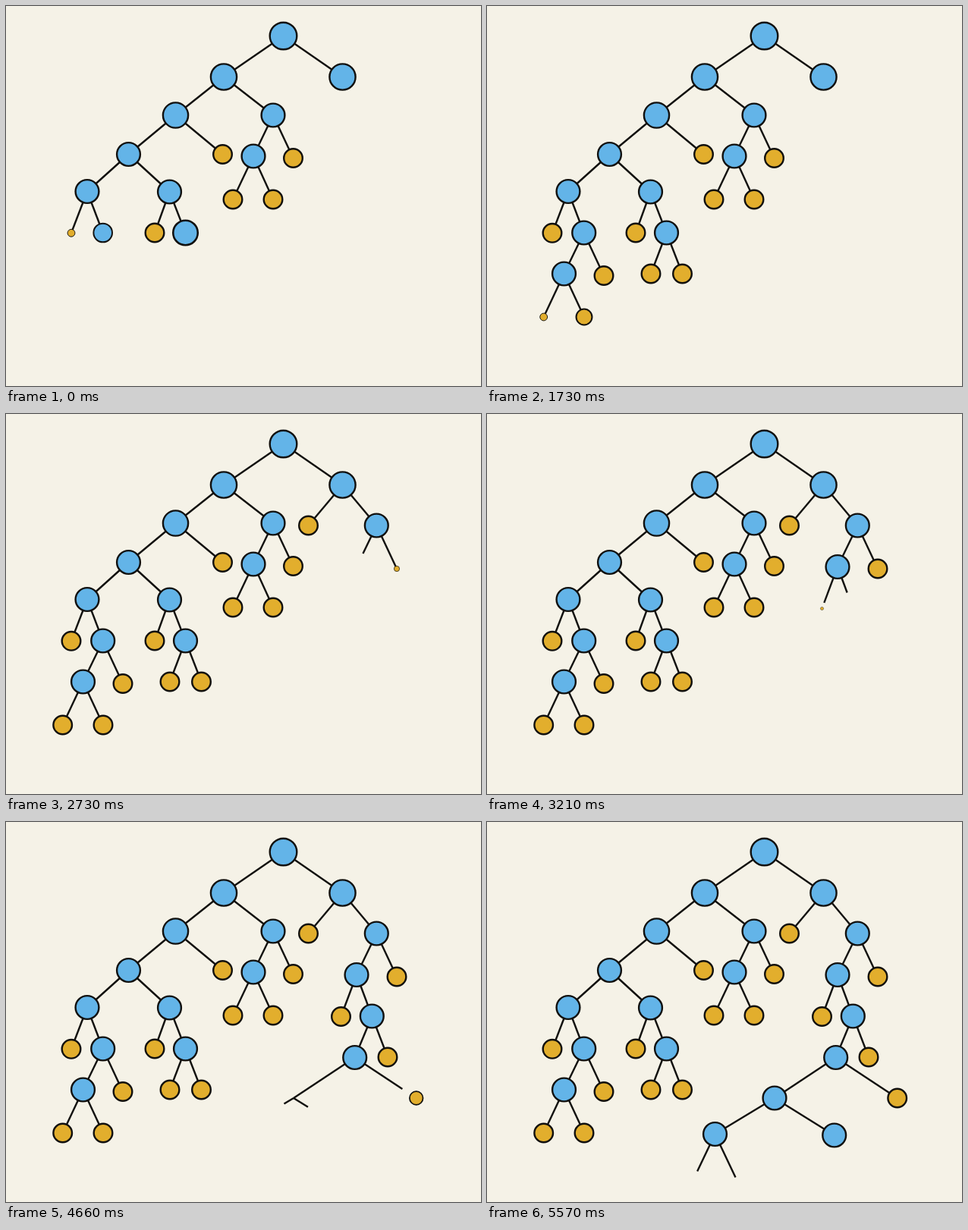
These frames come from a looping animation (626 by 501 pixels, 5590 ms). An HTML page with a canvas:

```html
<!DOCTYPE html>
<html lang="en">
<head>
<meta charset="utf-8">
<title>Growing tree</title>
<style>
html, body { margin: 0; width: 100%; height: 100%; overflow: hidden; background: #f5f2e7; }
canvas { display: block; width: 626px; height: 501px; }
</style>
</head>
<body>
<canvas id="stage"></canvas>
<script>
const W = 626, H = 501, LOOP = 5590;
const PEN_SPEED = 0.24;   // px per ms
const POP_TIME = 250;
const INK = "#11100e", BLUE = "#63b4e8", GOLD = "#e2ae2d", PAPER = "#f5f2e7";
const LINE = 2.4;
const ALWAYS = -9999;

const nodes = [];

// edgeAt: when the line to the parent starts; popAt: when the disc starts to grow
function add(fill, r, parent, x, y, edgeAt = ALWAYS, popAt = ALWAYS, popTime = POP_TIME) {
  const node = { fill, r, parent, x, y, edgeAt, popAt, popTime };
  nodes.push(node);
  return node;
}
const big = (r, ...rest) => add(BLUE, r, ...rest);
const blue = (...rest) => add(BLUE, 16.6, ...rest);
const gold = (...rest) => add(GOLD, 13.5, ...rest);

// Standing part of the tree
const root = big(19, null, 365.5, 39.5);
const left = big(18.3, root, 287, 93.5);
const right = big(18.3, root, 443.5, 93.5);
const outer = big(17.8, left, 223.5, 144);
const inner = blue(left, 352, 144);
const branch = blue(outer, 161.5, 195.5);
gold(outer, 285.5, 195.5);
const fork = blue(inner, 326, 198);
gold(inner, 378.5, 200.5);
gold(fork, 299, 255);
gold(fork, 352, 255);
const legA = blue(branch, 107, 244.5);
const legB = blue(branch, 215.5, 245);
gold(legB, 196, 299);

// Lower left
gold(legA, 86, 299.3, ALWAYS, -50);
const kneeA = blue(legA, 127.7, 299, ALWAYS, -112);
const kneeB = blue(legB, 236.5, 299, ALWAYS, -207);
gold(kneeB, 216, 353, 60, 310);
gold(kneeB, 257.5, 353, 110, 370);
gold(kneeA, 154, 355.5, 770, 985);
const footA = blue(kneeA, 101.5, 353, 830, 1090);
gold(footA, 128, 410, 1335, 1608);
gold(footA, 74.7, 410, 1410, 1680);

// Right side
gold(right, 398.5, 147, 1800, 2010);
const armA = blue(right, 488.3, 147, 1840, 2145);
gold(armA, 515, 204, 2455, 2694);
const armB = blue(armA, 462, 201.5, 2560, 2815);
gold(armB, 441.5, 256.5, 3000, 3190);
const armC = blue(armB, 482.3, 256, 3060, 3305);
gold(armC, 503, 310, 3575, 3845);
const hub = blue(armC, 459.7, 310.5, 3618, 3880);

// Bottom
const wide = blue(hub, 379, 364, 4224, 4675);
gold(hub, 540.7, 364, 4348, 4530, 333);
const lowA = blue(wide, 300.5, 411.5, 4600, 5005);
blue(wide, 457.7, 413, 4568, 5070);
gold(lowA, 327.5, 468.5, 5300, LOOP);
blue(lowA, 274.5, 466, 5345, LOOP);

const clamp = v => Math.max(0, Math.min(1, v));
// Rises past full size a little, then settles
const pop = u => Math.sin(1.9 * u) / Math.sin(1.9);

const canvas = document.getElementById("stage");
const ctx = canvas.getContext("2d");
const ratio = window.devicePixelRatio || 1;
canvas.width = Math.round(W * ratio);
canvas.height = Math.round(H * ratio);
ctx.scale(ratio, ratio);

function drawEdge({ parent, x, y, edgeAt }, t) {
  if (!parent) return;
  const dx = x - parent.x, dy = y - parent.y;
  const part = clamp((t - edgeAt) * PEN_SPEED / Math.hypot(dx, dy));
  if (!part) return;
  ctx.beginPath();
  ctx.moveTo(parent.x, parent.y);
  ctx.lineTo(parent.x + dx * part, parent.y + dy * part);
  ctx.stroke();
}

function drawDisc({ fill, r, x, y, popAt, popTime }, t) {
  const scale = pop(clamp((t - popAt) / popTime));
  if (scale <= 0) return;
  ctx.lineWidth = LINE * scale;
  ctx.fillStyle = fill;
  ctx.beginPath();
  ctx.arc(x, y, (r - LINE / 2) * scale, 0, Math.PI * 2);
  ctx.fill();
  ctx.stroke();
}

function draw(t) {
  ctx.fillStyle = PAPER;
  ctx.fillRect(0, 0, W, H);
  ctx.strokeStyle = INK;
  ctx.lineWidth = LINE;
  for (const node of nodes) drawEdge(node, t);
  for (const node of nodes) drawDisc(node, t);
}

const start = performance.now();
function tick() {
  draw((performance.now() - start) % LOOP);
  requestAnimationFrame(tick);
}
tick();
</script>
</body>
</html>
```
